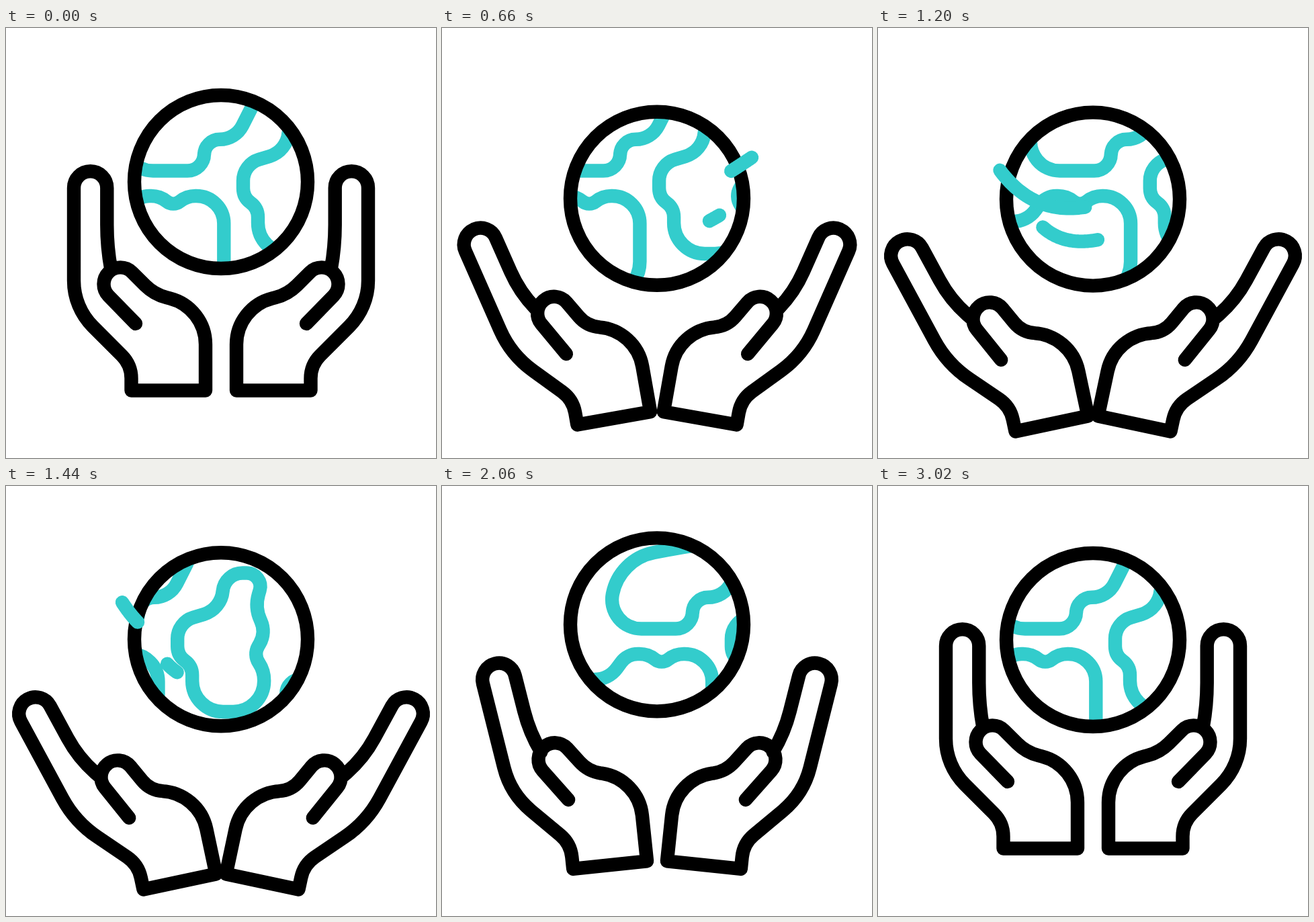
An HTML page with a canvas for the animation above (3600 ms loop, 640x640 px).

```html
<!DOCTYPE html>
<html lang="en">
<head>
<meta charset="utf-8">
<title>Globe in hands</title>
<style>
  html, body { margin: 0; width: 100%; height: 100%; overflow: hidden; background: #fff; }
  canvas { display: block; width: 100vmin; height: 100vmin; }
</style>
</head>
<body>
<canvas id="stage" width="640" height="640"></canvas>
<script>
const ctx = document.getElementById('stage').getContext('2d');
const LOOP = 3600;
const INK = '#000', TEAL = '#33cccc';
const LINE = 20.4;
const RADIUS = 129;
const MAP_WIDTH = 387;

// ---------- timing ----------
const clamp = v => Math.min(1, Math.max(0, v));
const smooth = x => x * x * (3 - 2 * x);
const ease = (t, from, to) => smooth(clamp((t - from) / (to - from)));

// Ease whose handles lie at x = a and x = b, flat at both ends.
function bezierEase(x, a, b) {
  let lo = 0, hi = 1;
  for (let i = 0; i < 24; i++) {
    const s = (lo + hi) / 2, r = 1 - s;
    if (3 * r * r * s * a + 3 * r * s * s * b + s * s * s < x) lo = s;
    else hi = s;
  }
  return smooth((lo + hi) / 2);
}

const handOpen = t => ease(t, 0, 890) - ease(t, 1530, 2590);
const globeY = t => 229 + 38.5 * ease(t, 220, 960) - 65 * ease(t, 960, 1804)
                        + 26.5 * ease(t, 1804, 2876);
const mapShift = t => 2 * MAP_WIDTH * bezierEase(clamp((t - 394) / 2606), 0.334, 0.236);

// ---------- rounded outlines ----------
// Corner points [x, y, cut]; cut is how far from the corner its arc begins,
// by default half of the shorter edge.
function roundCorner(path, prev, [x, y, cut], next) {
  const ax = prev[0] - x, ay = prev[1] - y, bx = next[0] - x, by = next[1] - y;
  const a = Math.hypot(ax, ay), b = Math.hypot(bx, by);
  const cos = (ax * bx + ay * by) / (a * b);
  const length = cut ?? Math.min(a, b) / 2;
  path.arcTo(x, y, next[0], next[1], length * Math.sqrt((1 - cos) / (1 + cos)));
}

function openOutline(pts) {
  const path = new Path2D(), end = pts.length - 1;
  path.moveTo(pts[0][0], pts[0][1]);
  for (let i = 1; i < end; i++) roundCorner(path, pts[i - 1], pts[i], pts[i + 1]);
  path.lineTo(pts[end][0], pts[end][1]);
  return path;
}

function closedOutline(...pts) {
  const path = new Path2D(), n = pts.length, last = pts[n - 1];
  path.moveTo((last[0] + pts[0][0]) / 2, (last[1] + pts[0][1]) / 2);
  pts.forEach((p, i) => roundCorner(path, pts[(i + n - 1) % n], p, pts[(i + 1) % n]));
  path.closePath();
  return path;
}

// ---------- hands ----------
// Opening turns each part about its pivot (degrees) and shifts it.
const palm = { pivot: [241.75, 539.5], shift: [16.8, 49.5], turn: -12 };
const finger = { pivot: [125.5, 238], shift: [-81.7, 101], turn: -28.5 };
const elbow = { pivot: [101, 416], shift: [2, 84], turn: 0 };
const thumb = { pivot: [170.2, 381], shift: [-4, 52], turn: 5.5 };
const TIP = 24.6;

const hand = [
  [palm, [156.5, 360]],
  [finger, [150.3, 326, 33], [150.3, 213.3, TIP], [101, 213.3, TIP]],
  [elbow, [101, 416, 40]],
  [palm, [186.5, 501.5, 20], [186.5, 539.5, 0], [297, 539.5, 0], [297, 416, 55]],
  [thumb, [220.5, 396.5, 19], [170.2, 346.2, TIP], [135.4, 381, TIP], [193, 440]]
];

function handShape(t) {
  const k = handOpen(t);
  return openOutline(hand.flatMap(([{ pivot, shift, turn }, ...pts]) => {
    const c = Math.cos(turn * k * Math.PI / 180), s = Math.sin(turn * k * Math.PI / 180);
    return pts.map(([x, y, cut]) => {
      const dx = x - pivot[0], dy = y - pivot[1];
      return [pivot[0] + shift[0] * k + dx * c - dy * s,
              pivot[1] + shift[1] * k + dx * s + dy * c, cut];
    });
  }));
}

// ---------- globe ----------
const lands = [
  closedOutline([166, 212.5], [295, 212.5, 25], [295, 165.8], [341.5, 165.8],
    [386, 78], [300, 87], [186, 109]),
  closedOutline([324.3, 250, 41], [269, 250], [249, 266], [229, 250], [198, 250], [170, 288],
    [128, 288], [128, 344], [165, 344], [200, 374], [220, 400], [324.3, 400]),
  closedOutline([423, 129.5], [483, 129.5], [468, 181], [485, 218], [466, 251], [482, 275],
    [482, 336, 46], [375, 336, 46], [375, 268], [353, 252], [353, 203], [418, 183])
];

function drawGlobe(t, y) {
  const disc = new Path2D();
  disc.arc(320, y, RADIUS, 0, 2 * Math.PI);
  ctx.save();
  ctx.clip(disc);
  ctx.strokeStyle = TEAL;
  ctx.translate(-(mapShift(t) % MAP_WIDTH), 0);
  for (let i = 0; i < 2; i++) {
    for (const land of lands) ctx.stroke(land);
    ctx.translate(MAP_WIDTH, 0);
  }
  ctx.restore();
  ctx.stroke(disc);
}

// ---------- sweeping lines ----------
// Cubic curves around the globe's centre.
const sweeps = [
  [[141, -61], [48, 2], [-68, 67], [-147, -55]],
  [[93, 25], [50, 50], [-30, 90], [-80, 36.5]]
];

function cubic([a, b, c, d], s) {
  const r = 1 - s;
  return [0, 1].map(k => r * r * r * a[k] + 3 * r * r * s * b[k] +
                         3 * r * s * s * c[k] + s * s * s * d[k]);
}

function drawSweeps(t, y) {
  const head = ease(t, 500, 1290), tail = ease(t, 800, 1590);
  if (head - tail < 0.001) return;
  ctx.save();
  ctx.translate(320, y);
  ctx.strokeStyle = TEAL;
  for (const curve of sweeps) {
    ctx.beginPath();
    for (let i = 0; i <= 30; i++) ctx.lineTo(...cubic(curve, tail + (head - tail) * i / 30));
    ctx.stroke();
  }
  ctx.restore();
}

// ---------- scene ----------
function draw(t) {
  ctx.fillStyle = '#fff';
  ctx.fillRect(0, 0, 640, 640);
  ctx.lineWidth = LINE;
  ctx.lineCap = ctx.lineJoin = 'round';
  ctx.strokeStyle = INK;

  const shape = handShape(t);
  ctx.stroke(shape);
  ctx.save();
  ctx.translate(640, 0);
  ctx.scale(-1, 1);
  ctx.stroke(shape);
  ctx.restore();

  const y = globeY(t);
  drawGlobe(t, y);
  drawSweeps(t, y);
}

const start = performance.now();
function tick() {
  draw((performance.now() - start) % LOOP);
  requestAnimationFrame(tick);
}
tick();
</script>
</body>
</html>
```
